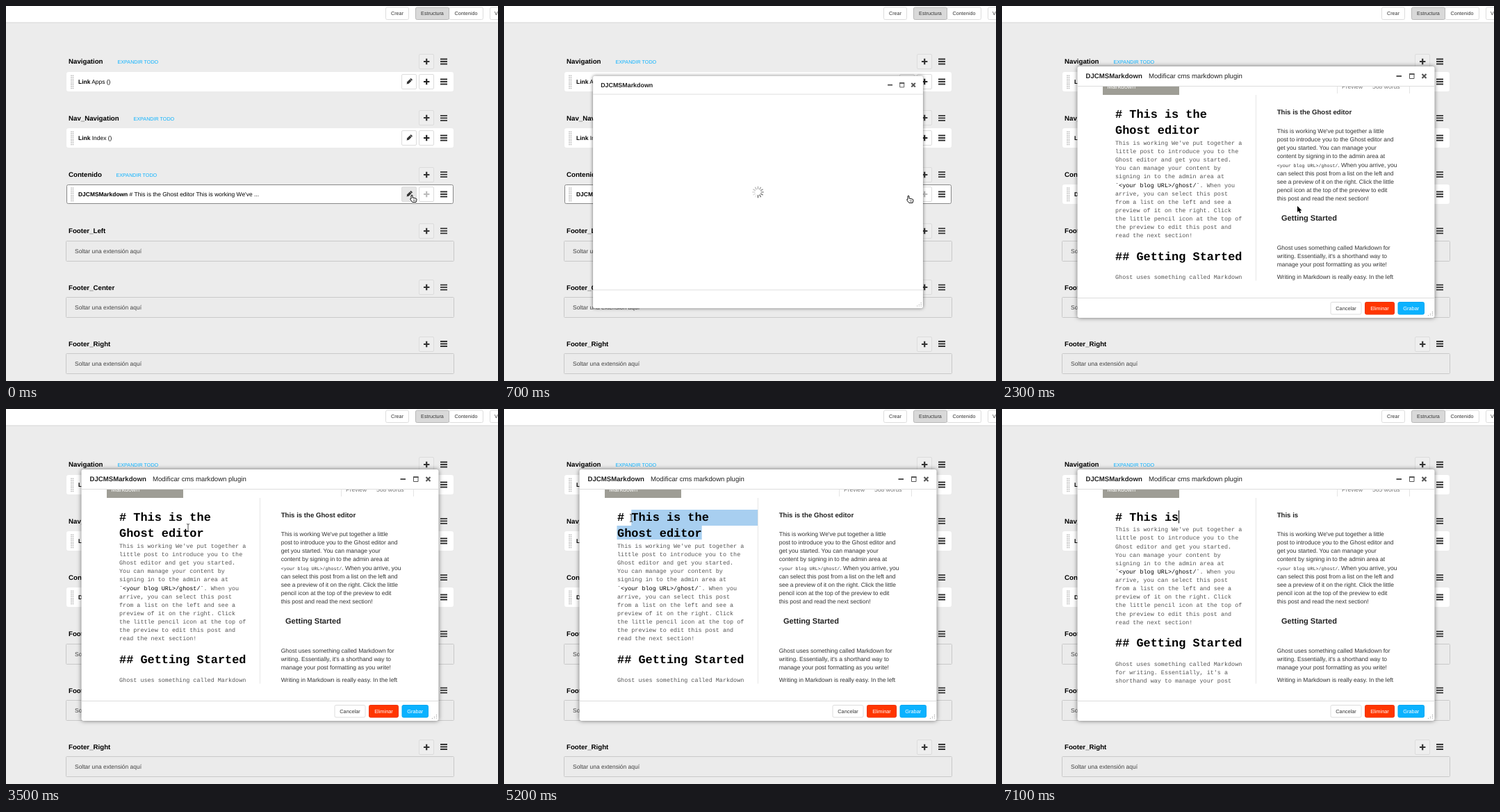
Recreate the animation shown at these times as an HTML page. Size 708 by 540 pixels, loop 7300 ms.

```html
<!DOCTYPE html>
<html lang="es">
<head>
<meta charset="utf-8">
<style>
html, body { margin: 0; width: 100%; height: 100%; overflow: hidden; background: #ececec; }
svg { display: block; font-family: "Liberation Sans", Arial, sans-serif; text-rendering: geometricPrecision; }
.mono { font-family: "Courier New", "Liberation Mono", monospace; }
.b { font-weight: bold; }
</style>
</head>
<body>
<svg id="stage" width="708" height="540" viewBox="0 0 708 540"></svg>
<script>
const LOOP = 7300, STEP = 100;
const stage = document.getElementById('stage');

const esc = s => s.replace(/</g, '&lt;').replace(/>/g, '&gt;');
const raw = (x, y, s, size, fill, cls = '', extra = '') =>
  `<text x="${x}" y="${y}" font-size="${size}" fill="${fill}" class="${cls}" ${extra}>${s}</text>`;
const text = (x, y, s, ...rest) => raw(x, y, esc(s), ...rest);
const lines = (x, y, pitch, list, ...rest) => list.map((s, i) => text(x, y + i * pitch, s, ...rest)).join('');
const rect = (x, y, w, h, fill, stroke = 'none', r = 0) =>
  `<rect x="${x}" y="${y}" width="${w}" height="${h}" rx="${r}" fill="${fill}" stroke="${stroke}"/>`;
const path = (d, stroke, width = 1, fill = 'none', extra = '') =>
  `<path d="${d}" stroke="${stroke}" stroke-width="${width}" fill="${fill}" ${extra}/>`;
const button = (x, y, w, h, label, fill, stroke, color, size = 7.2) =>
  rect(x, y, w, h, fill, stroke, 2) +
  text(x + w / 2, y + h / 2 + 2.6, label, size, color, '', 'text-anchor="middle"');

// ---- page ----
const plus = (y, fill, stroke, color) =>
  rect(594.5, y - 10.5, 21, 21, fill, stroke, 1.5) + path(`M601 ${y}h8.4M605.2 ${y - 4.2}v8.4`, color, 2.2);
const menu = y => path(`M625 ${y - 3.5}h10M625 ${y}h10M625 ${y + 3.5}h10`, '#333', 1.8);
const pencil = (y, fill) =>
  rect(569.5, y - 10.5, 21, 21, fill, '#ddd', 1.5) +
  `<g transform="translate(580.3 ${y - .3}) rotate(45)">` +
  path('M-1.7-5h3.4v7.6l-1.7 2.6-1.7-2.6z', 'none', 0, '#333') + path('M-1.7-3h3.4', fill, .7) + '</g>';
const grip = y => [94, 96.5].map(x =>
  path(`M${x} ${y - 9.5}v20`, '#b5b5b5', 1.5, 'none', 'stroke-dasharray="1.5 1.1"')).join('');

const slots = [
  ['Navigation', 160.5, 'Link', 'Apps ()'],
  ['Nav_Navigation', 183.5, 'Link', 'Index ()'],
  ['Contenido', 158.5, 'DJCMSMarkdown', "# This is the Ghost editor This is working We've ..."],
  ['Footer_Left'], ['Footer_Center'], ['Footer_Right']
];

function slot([name, linkX, kind, label], i, hover) {
  const y = 80 + 81.3 * i, row = Math.round(y + 28.6);
  let s = text(90, y + 3.4, name, 9.7, '#000', 'b') + plus(Math.round(y), '#eee', '#dcdcdc', '#333') + menu(y);
  if (!kind) return s + rect(86.5, row - 14.5, 558, 29, '#ebebeb', '#c9c9c9', 1) +
    text(99, row + 2.6, 'Soltar una extensión aquí', 8.47, '#444');
  const on = hover && i === 2;
  s += text(linkX, y + 3.2, 'EXPANDIR TODO', 7.2, '#0bb2ff');
  s += rect(87.5, row - 13.5, 556, 27, '#fff', on ? '#888' : '#fff', 2) + grip(row);
  s += raw(104, row + 2.9, `<tspan class="b">${kind}</tspan> ${label}`, 8.45, '#000');
  return s + pencil(row, on ? '#e6e6e6' : '#fff') + plus(row, '#fff', '#ddd', on ? '#bbb' : '#222') + menu(row);
}

const page = hover =>
  rect(0, 0, 708, 540, '#ececec') + rect(0, 0, 708, 23.5, '#fff') + path('M0 24h708', '#d9d9d9') +
  button(546.5, 2, 33, 17.5, 'Crear', '#fff', '#ddd', '#333') +
  button(637.5, 2, 49, 17.5, 'Contenido', '#fff', '#ddd', '#333') +
  button(589.5, 2, 48, 17.5, 'Estructura', '#d9d9d9', '#b8b8b8', '#333') +
  rect(696.5, 2, 40, 17.5, '#fff', '#ddd', 2) + text(703, 13.4, 'V', 7.2, '#333') +
  slots.map((d, i) => slot(d, i, hover)).join('');

// ---- dialog ----
const CHAR = 10.14, LEFT = 163, TITLE = 'This is the Ghost editor';

const post = [
  "This is working We've put together a", 'little post to introduce you to the',
  'Ghost editor and get you started.', 'You can manage your content by',
  'signing in to the admin area at', '`<your blog URL>/ghost/`. When you',
  'arrive, you can select this post', 'from a list on the left and see a',
  'preview of it on the right. Click', 'the little pencil icon at the top of',
  'the preview to edit this post and', 'read the next section!'
];
const nextPost = ['Ghost uses something called Markdown', "for writing. Essentially, it's a", 'shorthand way to manage your post'];

const frame = () =>
  `<g style="filter:drop-shadow(0 0 3px rgba(0,0,0,.55))">${rect(108.5, 87, 514, 362, '#fff', 'none', 3)}</g>` +
  path('M108.5 115.5h514M108.5 420.5h514', '#ddd') +
  text(120.5, 104.4, 'DJCMSMarkdown', 9.65, '#222', 'b') +
  path('M567.5 101h7.5', '#555', 2) +
  path('M586.5 98v6.5h6.5V98zM586 98h7.5', '#555') + path('M586 98h7.5', '#555', 1.8) +
  path('M604.5 98l6 6M610.5 98l-6 6', '#555', 2.1) +
  path('M619.5 440v6M616.5 443v3M613.5 445v1', '#aaa', 1.2, 'none', 'stroke-dasharray="1.2 1.4"');

const spinner = t => Array.from({ length: 12 }, (_, i) =>
  `<path d="M0-4.5v-4.5" stroke="#333" stroke-width="1.4" opacity="${.1 + .75 * ((i + 12 - t / 100 % 12) % 12) / 12}"
    transform="translate(365.5 268) rotate(${i * 30})"/>`).join('');

function selection(x, y) {
  const from = LEFT + Math.round((x - LEFT) / CHAR) * CHAR, blue = '#a8cff0', end = LEFT + 12 * CHAR;
  return y > 168 ? rect(from, 168, Math.max(0, end - from), 20, blue)
    : rect(from, 145, 365 - from, 23, blue) + rect(162.5, 168, end - 162.5, 20, blue);
}

function editor(typed) {
  const shift = typed === null ? 0 : -23.6;
  let s = shift ? text(LEFT, 160.6, '# ' + typed, 16.9, '#000', 'mono b')
    : lines(LEFT, 160.6, 23.6, ['# This is the', 'Ghost editor'], 16.9, '#000', 'mono b');
  s += post.map((line, i) => {
    const html = esc(line).replace(/`.*`/, '<tspan fill="#000">$&</tspan>');
    return raw(LEFT, 199.9 + shift + i * 12.12, html, 8.45, '#555', 'mono');
  }).join('');
  s += text(LEFT, 365.8 + shift, '## Getting Started', 16.9, '#000', 'mono b');
  s += lines(LEFT, 393.3 + shift, 12.12, nextPost, 8.45, '#555', 'mono');
  if (shift) {
    const x = LEFT + (2 + typed.length) * CHAR + .3;
    s += path(`M${x} 146v18.5`, '#000');
  }
  return s;
}

function preview(title) {
  const words = 563 + title.trim().split(' ').length;
  return rect(145, 112, 110, 16, '#9e9d95') + text(151.5, 119.3, 'Markdown', 8.8, '#fff') +
    path('M482.5 116v10M586.5 116v10', '#e4e4e4') + path('M365.5 128v268', '#e6e6e6') +
    text(489, 119.3, 'Preview', 8.5, '#777') + text(533, 119.3, words + ' words', 8.6, '#777') +
    text(395.7, 156.2, title, 9.65, '#222', 'b') +
    lines(395.7, 183, 12.15, ["This is working We've put together a little",
      'post to introduce you to the Ghost editor and', 'get you started. You can manage your',
      'content by signing in to the admin area at'], 8.5, '#333') +
    raw(395.7, 231.6, `<tspan class="mono" font-size="6.65">${esc('<your blog URL>/ghost/')}</tspan>. When you arrive, you`, 8.5, '#333') +
    lines(395.7, 243.75, 12.15, ['can select this post from a list on the left and',
      'see a preview of it on the right. Click the little', 'pencil icon at the top of the preview to edit',
      'this post and read the next section!'], 8.5, '#333') +
    text(402, 308.8, 'Getting Started', 11.07, '#222', 'b') +
    lines(395.7, 351, 12.15, ['Ghost uses something called Markdown for',
      "writing. Essentially, it's a shorthand way to", 'manage your post formatting as you write!'], 8.5, '#333') +
    text(395.7, 393.4, 'Writing in Markdown is really easy. In the left', 8.5, '#333');
}

const typing = [6000, 6200, 6400, 6600, 6800, 7000, 7100];

function dialog(t, [x, y]) {
  if (t < 900) {
    const k = Math.sin(Math.PI / 2 * Math.min(1, (t - 400) / 400));
    return `<g transform="translate(365.5 268) scale(${k}) translate(-365.5 -268)">${frame()}${spinner(t)}</g>`;
  }
  const count = typing.filter(at => t >= at).length;
  const typed = count ? 'This is'.slice(0, count) : null;
  let s = frame() + text(211, 104.4, 'Modificar cms markdown plugin', 9.65, '#222');
  s += '<g clip-path="url(#view)">';
  if (t >= 4700 && !count) s += selection(x, y);
  s += editor(typed) + preview(typed || TITLE) + '</g>';
  return s + button(473, 426.5, 44, 17.5, 'Cancelar', '#fff', '#ddd', '#333', 7.35) +
    button(522.5, 426.5, 42, 17.5, 'Eliminar', '#ff3600', '#f03000', '#fff', 7.4) +
    button(570, 426.5, 37.5, 17.5, 'Grabar', '#0bb2ff', '#00a6f2', '#fff', 7.4);
}

// ---- pointer: time, x, y ----
const track = [
  [0, 584, 272], [300, 582, 273], [800, 582, 273], [900, 583, 272], [1200, 583, 272], [1500, 506, 253],
  [1700, 506, 253], [2000, 470, 236], [2300, 425, 288], [2500, 342, 272], [2800, 260, 222.5], [3200, 260, 222.5],
  [3400, 250, 192], [3500, 262, 171], [3600, 262, 171], [4000, 296, 161], [4200, 291, 181], [4400, 285.5, 178],
  [4600, 285.5, 178], [5200, 183, 157], [LOOP, 183, 157]
];

function pointerAt(t) {
  const i = track.findIndex(k => k[0] > t), [t0, x0, y0] = track[i - 1], [t1, x1, y1] = track[i];
  const u = (t - t0) / (t1 - t0);
  return [x0 + (x1 - x0) * u, y0 + (y1 - y0) * u];
}

function pointer(t, [x, y]) {
  if (t >= 6000) return '';
  let s;
  if (t < 900) s = path('M-1 .8q1-1.4 2 0v3.2l5 1.2q1.2.5 1 2l-1 3.3h-5.2l-3-4q-.4-1.6 1.2-.9z', '#111', 1, '#fff') +
    path('M2.6 6.5v2.3M4.4 6.8v2', '#111', .7);
  else if (x > 365) s = path('M0 0v9l2.1-1.9 1.5 3.4 1.6-.7-1.5-3.3h2.8z', '#fff', 1.2, '#000', 'paint-order="stroke"');
  else s = path('M-2-5.5q2 0 2 1.2 0-1.2 2-1.2M0-4.5v9M-2 5.5q2 0 2-1.2 0 1.2 2 1.2', '#222', .8);
  if (t >= 4500 && t < 4700) s += path('M0-9v18.5', '#333', .8);
  return `<g transform="translate(${x} ${y})">${s}</g>`;
}

const scene = t => {
  const p = pointerAt(t);
  return '<clipPath id="view"><path d="M109 116h513v279.5h-513z"/></clipPath>' +
    page(t < 900) + (t > 400 ? dialog(t, p) : '') + pointer(t, p);
};

let shown = -1;
const start = performance.now();
function draw() {
  const t = Math.floor((performance.now() - start) % LOOP / STEP) * STEP;
  if (t !== shown) stage.innerHTML = scene(shown = t);
  requestAnimationFrame(draw);
}
draw();
</script>
</body>
</html>
```
